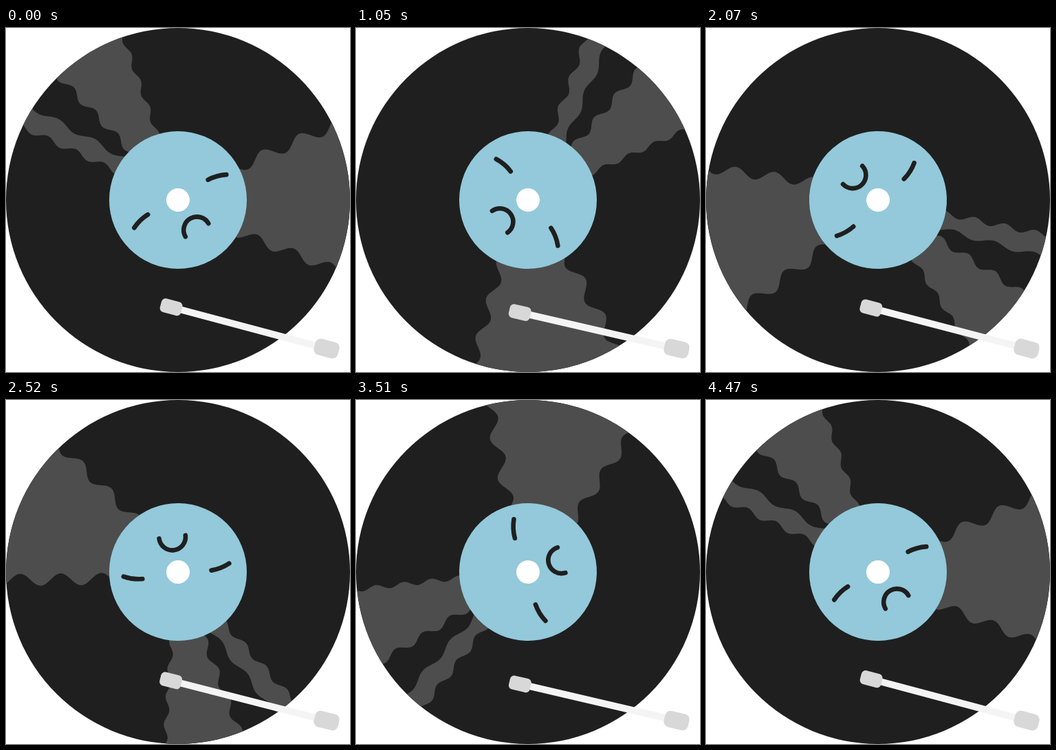
These frames come from a looping animation (500 by 500 pixels, 4500 ms). An HTML page:

```html
<!DOCTYPE html>
<html lang="en">
<head>
<meta charset="utf-8">
<title>Sleepy record</title>
<style>
  html, body { margin: 0; width: 100%; height: 100%; overflow: hidden; background: #fff; }
  svg { display: block; width: 500px; height: 500px; }
  .face { fill: none; stroke: #1f1f1f; stroke-width: 6.6; stroke-linecap: round; }
</style>
</head>
<body>
<svg viewBox="0 0 500 500">
  <clipPath id="rim"><circle cx="250" cy="250" r="250"/></clipPath>
  <circle cx="250" cy="250" r="250" fill="#1f1f1f"/>
  <g clip-path="url(#rim)">
    <g id="disc">
      <g id="shine" fill="#4d4d4d"></g>
      <circle cx="250" cy="250" r="100" fill="#93c9da"/>
      <g class="face" transform="translate(250 250) rotate(-30)">
        <path d="M-75.3 3.2Q-62.5-3.2-48.5-3.6"/>
        <path d="M79.3 3.2Q66.5-3.2 52.5-3.6"/>
        <path d="M-17.3 51.6A19.3 19.3 0 0 1 21.3 51.6"/>
      </g>
      <circle cx="250" cy="250" r="17" fill="#fff"/>
    </g>
  </g>
  <g id="arm">
    <rect x="-220" y="-5" width="210" height="10" fill="#f4f4f4"/>
    <rect x="-249.5" y="-10.2" width="31.5" height="20.4" rx="6" fill="#d8d8d8"/>
    <rect x="-18" y="-12" width="36" height="24" rx="8" fill="#d8d8d8"/>
  </g>
</svg>
<script>
  const STEP = 30, STEPS = 150, LAST = STEPS - 1;
  const OVERRUN = 30; // edges run on past the rim and under the label
  const $ = id => document.getElementById(id);

  // A line from the rim to the label with a cosine wave across it.
  function edge({ from: [x, y], to: [tx, ty], amp, wave, peak }) {
    const len = Math.hypot(tx - x, ty - y);
    const dx = (tx - x) / len, dy = (ty - y) / len;
    const pts = [];
    for (let s = -OVERRUN; s < len + OVERRUN; s += 2) {
      const n = amp * Math.cos((s - peak) / wave * 2 * Math.PI);
      pts.push([x + dx * s + dy * n, y + dy * s - dx * n]);
    }
    return pts;
  }

  const streaks = [
    [{ from: [171, 15], to: [220, 155], amp: 3.4, wave: 40.5, peak: 26 },
     { from: [78, 72], to: [181, 179], amp: 5, wave: 46, peak: 25 }],
    [{ from: [39, 116], to: [172, 189], amp: 3.8, wave: 60, peak: 41 },
     { from: [26, 145], to: [159, 208], amp: 4.2, wave: 45, peak: 37 }],
    [{ from: [475, 142], to: [340, 201], amp: 8.8, wave: 59, peak: 20 },
     { from: [478, 351], to: [341, 299], amp: 7.4, wave: 57, peak: 38 }]
  ];

  $('shine').innerHTML = streaks.map(([a, b]) =>
    `<polygon points="${[...edge(a), ...edge(b).reverse()].join(' ')}"/>`
  ).join('');

  function draw() {
    const step = Math.floor(performance.now() / STEP) % STEPS;
    const turn = step / LAST;
    const swing = Math.abs((turn * 2) % 1 * 2 - 1); // 1 at the ends, 0 mid-swing
    $('disc').setAttribute('transform', `rotate(${turn * 360} 250 250)`);
    $('arm').setAttribute('transform', `translate(466 466) rotate(${12.85 + 2.1 * swing})`);
    requestAnimationFrame(draw);
  }
  draw();
</script>
</body>
</html>
```
